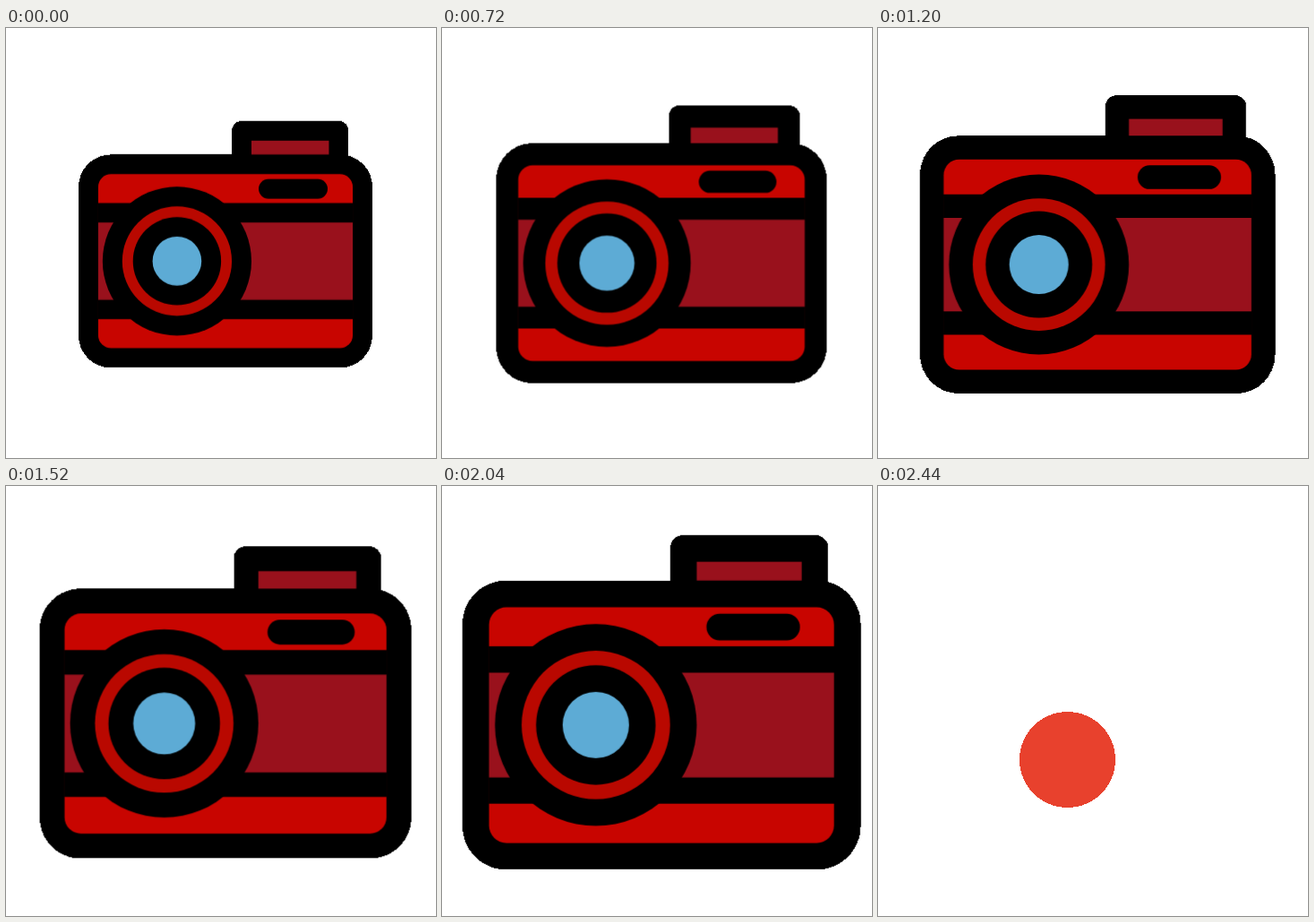
These frames come from a looping animation (480 px wide and 480 px high, 3000 ms). An HTML page without scripts:

```html
<!DOCTYPE html>
<html lang="en">
<head>
<meta charset="utf-8">
<title>Camera</title>
<style>
  html, body { margin: 0; height: 100%; overflow: hidden; background: #fff; }
  svg { display: block; width: 100vw; height: 100vh; }

  /* The 1 ms lead keeps steps clear of rounding at their boundaries. */
  .camera, .dot { animation: 3s step-end -1ms infinite; }
  .camera {
    transform-origin: 245px 241.5px;
    animation-name: grow, shutter;
    animation-timing-function: steps(57), step-end;
  }
  .dot { animation-name: flash; }

  /* 57 steps of 40 ms; full size is reached on the last visible one. */
  @keyframes grow {
    0% { transform: scale(.7193); }
    76%, 100% { transform: scale(1.005); }
  }
  @keyframes shutter {
    0% { visibility: visible; }
    76%, 100% { visibility: hidden; }
  }
  @keyframes flash {
    0% { visibility: hidden; }
    81.3333%, 100% { visibility: visible; }
  }

  .hard { shape-rendering: crispEdges; }
  .red { fill: #c80500; }
  .dark { fill: #99111c; }
  .ring { fill: #b90800; }
  .glass { fill: #5dabd5; }
  .dot { fill: #e8412d; }
</style>
</head>
<body>
<svg viewBox="0 0 480 480">
  <g class="camera">
    <g class="hard">
      <rect x="255" y="50" width="181" height="80" rx="15"/>
      <rect x="17" y="102" width="456" height="331" rx="50"/>
    </g>
    <rect class="dark" x="285.3" y="80.5" width="120.2" height="21.5"/>
    <rect class="red" x="47.5" y="132.5" width="395" height="270" rx="20"/>
    <rect x="47" y="177.3" width="396" height="180.2"/>
    <rect class="dark" x="47.5" y="207.5" width="395" height="120"/>
    <rect x="296.5" y="140" width="107" height="30.5" rx="15.2"/>
    <g transform="translate(169.8 267.4)">
      <circle r="115.5"/>
      <circle class="ring" r="85"/>
      <circle r="68.4"/>
      <circle class="glass" r="38"/>
    </g>
  </g>
  <circle class="dot hard" cx="211.5" cy="305.5" r="53.5"/>
</svg>
</body>
</html>
```
